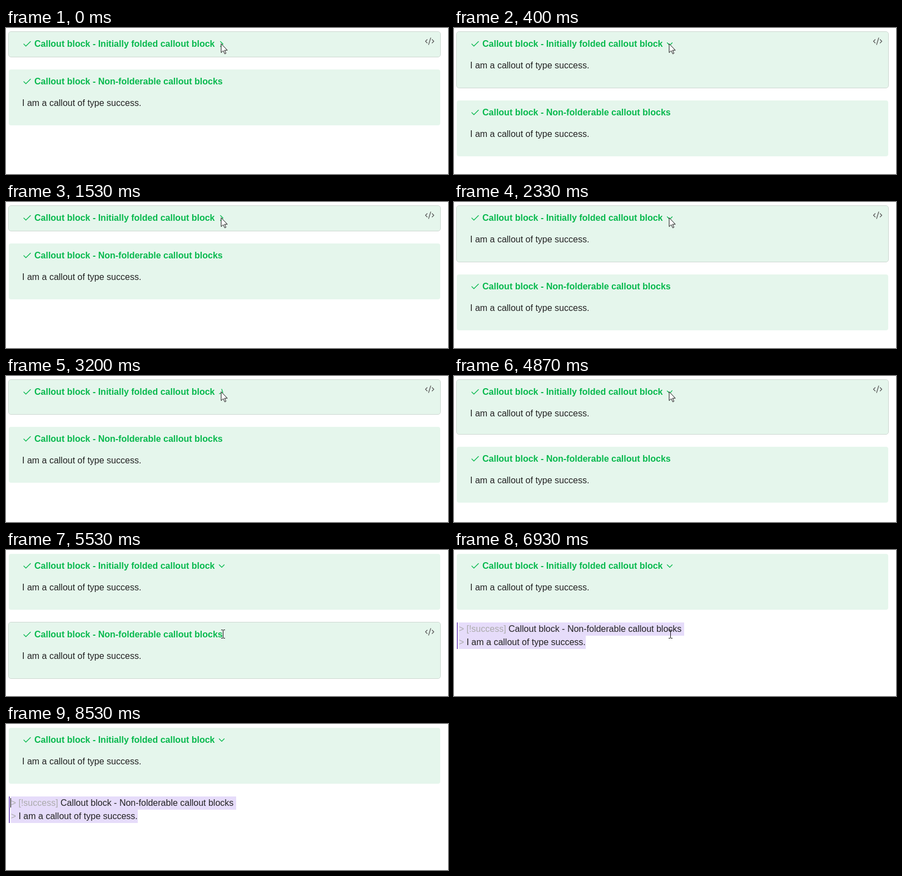
An HTML page for the animation above (8.94 s loop, 795 by 264 pixels).

```html
<!DOCTYPE html>
<html lang="en">
<head>
<meta charset="utf-8">
<title>Folding callouts</title>
<style>
  html, body { margin: 0; width: 100%; height: 100%; overflow: hidden; background: #fff; }
  #stage { display: block; width: 795px; height: 264px; font: 16px "Liberation Sans", Arial, sans-serif; fill: #222; }
  #stage svg { overflow: hidden; }
  .card { fill: #e5f6ec; }
  .ring { fill: none; stroke: #cdd8d1; }
  .title { font-weight: 700; fill: #08b94e; }
  .icon { fill: none; stroke: #08b94e; stroke-width: 1.75; stroke-linecap: round; stroke-linejoin: round; }
  .code { stroke: #5a5a5a; }
  .mark { fill: #ababab; }
  .select { fill: #e6dcfa; }
  .bar { fill: #8a6bc8; }
</style>
</head>
<body>
<svg id="stage" viewBox="0 0 795 264">
  <g id="blocks"></g>
  <g id="source">
    <rect class="bar" x="5" y="131" width="2" height="48"/>
    <path class="select" d="M8.7 131H414V155H237V179H8.7Z"/>
    <text x="8.7" y="148"><tspan class="mark">&gt; [!success]</tspan> Callout block - Non-folderable callout blocks</text>
    <text x="8.7" y="172"><tspan class="mark">&gt;</tspan> I am a callout of type success.</text>
    <rect id="caret" x="8" y="134" width="1" height="17" fill="#000"/>
  </g>
  <path id="arrow" d="M.5 .5V16.5L4.2 13L7 18.8L9.2 17.8L6.6 12.2H11.6Z" fill="#fff" stroke="#111" stroke-linejoin="round"/>
  <path id="beam" d="M-3 -7.5H0M1 -7.5H4M.5 -7V7M-3 7.5H0M1 7.5H4" fill="none" stroke="#111"/>
</svg>
<script>
const LOOP = 8940, FOLDED = 45, CONTENT = 56;
const $ = id => document.getElementById(id);
const show = (el, on) => el.setAttribute('visibility', on ? 'visible' : 'hidden');
const move = (el, x, y) => el.setAttribute('transform', `translate(${x} ${y})`);

function makeBlock(title, foldable) {
  const g = document.createElementNS('http://www.w3.org/2000/svg', 'g');
  g.innerHTML = `
    <rect class="card" x="5" width="776" rx="4"/>
    <rect class="ring" x="4.5" y="-.5" width="777" rx="4.5"/>
    <path class="icon" d="M20 6L9 17L4 12" transform="translate(29 13) scale(.75)"/>
    <text class="title" x="51" y="27">${title}</text>
    ${foldable ? '<path class="icon chevron" d="M-6 -3L0 3L6 -3"/>' : ''}
    <svg class="body" y="33" width="795"><text x="29" y="33">I am a callout of type success.</text></svg>
    <path class="icon code" d="M18 16L22 12L18 8M6 8L2 12L6 16M14.5 4L9.5 20" transform="translate(753 8) scale(.75)"/>`;
  $('blocks').append(g);
  const part = name => g.querySelector('.' + name);
  const card = part('card'), ring = part('ring'), body = part('body');
  const code = part('code'), chevron = part('chevron');
  return {
    g,
    draw(y, open, hover, turn) {
      move(g, 0, y);
      card.setAttribute('height', FOLDED + open);
      ring.setAttribute('height', FOLDED + open + 1);
      body.setAttribute('height', open);
      show(ring, hover);
      show(code, hover);
      if (chevron) chevron.setAttribute('transform', `translate(388 22) rotate(${-90 * (1 - turn)}) scale(.75)`);
    }
  };
}

const first = makeBlock('Callout block - Initially folded callout block', true);
const second = makeBlock('Callout block - Non-folderable callout blocks', false);

// [start, share of the content visible after each step]
const folds = [
  [200, .3, .75, .95, 1],
  [930, .7, .15, 0],
  [1530, 0, .65, 1],
  [2330, 1, .45, .12, 0],
  [3200, .3, .75, .95, 1],
  [4130, 1, .45, .12, 0],
  [4730, .3, .75, .95, 1]
];

// Counts the steps begun since start, one every 1/15 s
const stepsSince = (start, t) => Math.floor((t - start + 1.6) / 66.4);

function openness(t) {
  const fold = folds.filter(f => f[0] <= t).pop();
  if (!fold) return 0;
  const steps = fold.slice(1);
  return steps[Math.min(stepsSince(fold[0], t), steps.length - 1)];
}

function pointer(t) {
  if (t < 5530) {
    const k = Math.min(9, Math.max(0, stepsSince(4933, t))) / 9;
    const e = k * k * (3 - 2 * k);
    return [387 + Math.round(3 * e), 28 + Math.round(124 * e)];
  }
  if (t < 6930) return [390, 152];
  if (t < 7130) return [389, 152];
  if (t < 7730) return [390, 153];
  if (t < 7800) return [392, 153];
  if (t < 8130) return [394, 153];
  const k = Math.min(7, stepsSince(8130, t) + 1) / 7;
  return [394, 153 + Math.round(124 * Math.pow(k, 1.5))];
}

function draw(t) {
  const share = openness(t);
  const open = Math.round(CONTENT * share);
  const [x, y] = pointer(t);
  const editing = t >= 5930;
  const top = 75 + open;

  first.draw(7, open, y < 52 + open, share);
  second.draw(top, CONTENT, !editing && y >= top, 1);
  second.g.style.display = editing ? 'none' : '';
  $('source').style.display = editing ? '' : 'none';
  show($('caret'), Math.floor((t - 5930) / 600) % 2 === 0);

  const overTitle = y < 46;
  show($('arrow'), overTitle);
  show($('beam'), !overTitle);
  move($('arrow'), x - .5, y);
  move($('beam'), x, y);
}

const start = performance.now();
function tick() {
  draw((performance.now() - start) % LOOP);
  requestAnimationFrame(tick);
}
tick();
</script>
</body>
</html>
```
